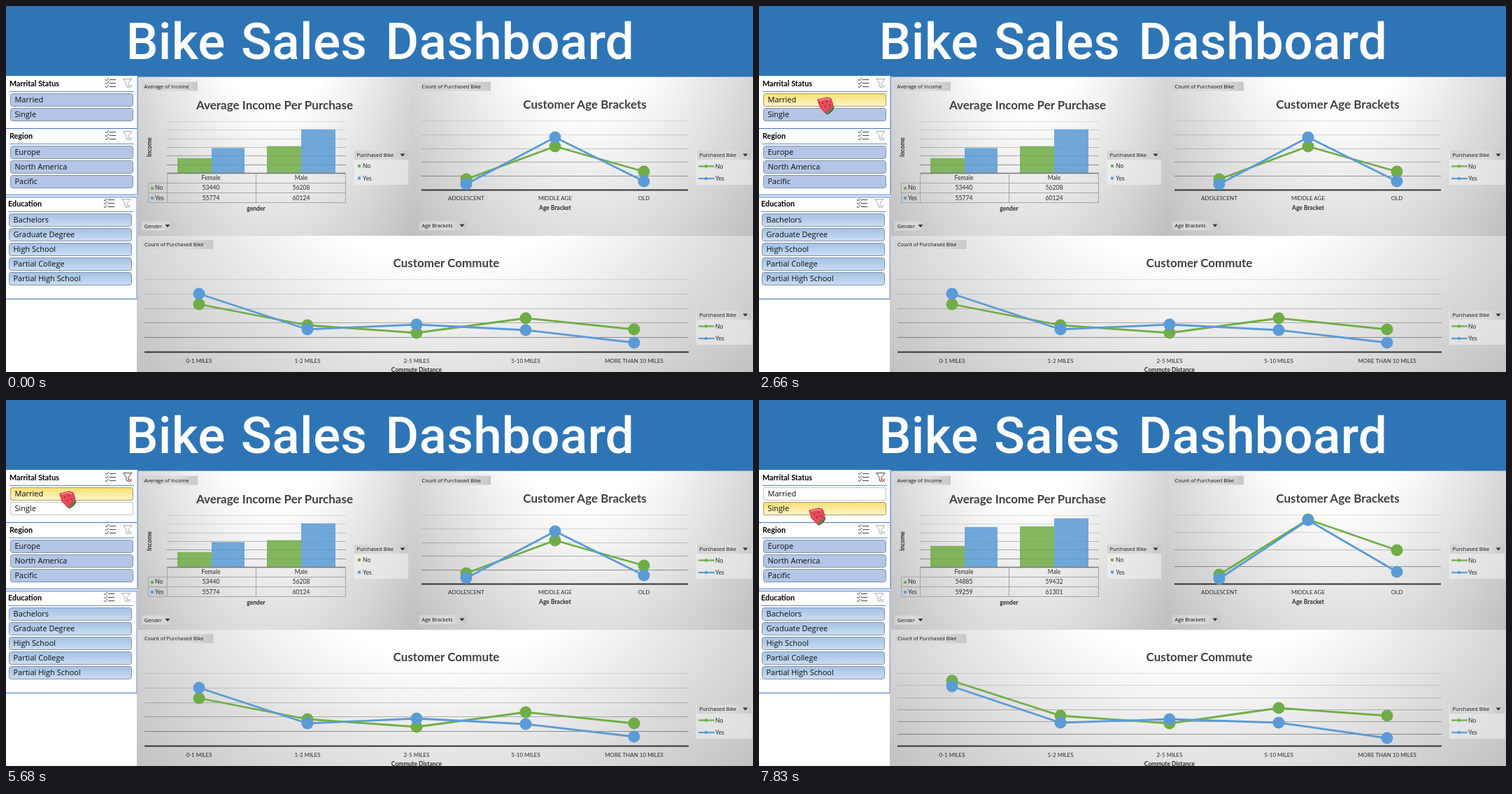
An HTML page for the animation above (8000 ms loop, 1068 by 524 pixels).

```html
<!DOCTYPE html>
<html lang="en">
<head>
<meta charset="utf-8">
<title>Bike Sales Dashboard</title>
<style>
  @property --p { syntax: "<number>"; inherits: true; initial-value: 0; }
  html, body { margin: 0; width: 100%; height: 100%; overflow: hidden; background: #fff; }
  #stage { position: relative; width: 1068px; height: 524px; overflow: hidden; }
  .chart { position: absolute; background: radial-gradient(70.7% 254.6% at 50% -80%, #fff 39%, #bfbfbf); }
  svg { position: absolute; inset: 0; display: block; animation: grow 8s infinite; }
  text { font-family: Lato, "Open Sans", sans-serif; fill: #2b2b2b; }
  .banner { font: 500 73px Roboto, sans-serif; fill: #fff; letter-spacing: .2px; }
  .title { font-size: 17px; font-weight: 700; fill: #404040; text-anchor: middle; }
  .name { font-size: 8.5px; font-weight: 700; text-anchor: middle; }
  .tick { font-size: 8px; text-anchor: middle; }
  .cell { font-size: 8.6px; text-anchor: middle; }
  .key { font-size: 8.6px; }
  .field { font: 7.4px "Open Sans", sans-serif; fill: #111; }
  .head { font-size: 10.8px; font-weight: 700; fill: #000; }
  .item { font: 11px "Open Sans", sans-serif; fill: #0c0c0c; }

  .step { opacity: 0; animation: 8s step-end infinite; }
  #MarriedHover { animation-name: married-hover; }
  #SingleHover { animation-name: single-hover; }
  #MarriedOff { animation-name: married-off; }
  #SingleOff, #filterOn { animation-name: single-off; }
  #cursor { animation: wander 8s ease-in-out infinite; }

  @keyframes grow {
    0%, 73.75% { --p: 0; animation-timing-function: ease-in-out; }
    83.4%, 100% { --p: 1; }
  }
  @keyframes married-hover {
    0% { opacity: 0 } 23.6% { opacity: 1 } 49.8% { opacity: 0 }
    60% { opacity: 1 } 85.2% { opacity: 0 } 100% { opacity: 0 }
  }
  @keyframes single-hover {
    0% { opacity: 0 } 49.8% { opacity: 1 } 60% { opacity: 0 }
    85.2% { opacity: 1 } 100% { opacity: 1 }
  }
  @keyframes married-off { 0% { opacity: 0 } 93.3% { opacity: 1 } 100% { opacity: 1 } }
  @keyframes single-off { 0% { opacity: 0 } 66.2% { opacity: 1 } 100% { opacity: 1 } }
  @keyframes wander {
    0%, 2.8% { transform: translate(994px, 526px); }
    12.7% { transform: translate(148px, 126px); }
    13.37% { transform: translate(137px, 121px); }
    18.1% { transform: translate(118px, 159px); }
    23.1% { transform: translate(110px, 134px); }
    29.5%, 48% { transform: translate(83px, 130px); }
    52.3%, 55.1% { transform: translate(78px, 161px); }
    65.1%, 83.9% { transform: translate(76px, 130px); }
    87.1%, 93.1% { transform: translate(71px, 148px); }
    95.7%, 100% { transform: translate(71px, 154px); }
  }
</style>
</head>
<body>
<div id="stage">
  <div class="chart" style="left:188px;top:102px;width:395px;height:227px"></div>
  <div class="chart" style="left:583px;top:102px;width:485px;height:227px"></div>
  <div class="chart" style="left:187px;top:329px;width:881px;height:214px"></div>
  <svg id="art" width="1068" height="524" viewBox="0 0 1068 524"></svg>
</div>
<script>
const GREEN = '#70ad47', BLUE = '#5b9bd5', EDGE = '#4472c4', RULE = '#a6a6a6';
const art = document.getElementById('art');

const text = (cls, x, y, s, more = '') => `<text class="${cls}" x="${x}" y="${y}" ${more}>${s}</text>`;
const rect = (x, y, w, h, fill, more = '') =>
  `<rect x="${x}" y="${y}" width="${w}" height="${h}" fill="${fill}" ${more}/>`;
const line = (x1, y1, x2, y2, color, w = 1) =>
  `<path d="M${x1} ${y1}L${x2} ${y2}" stroke="${color}" stroke-width="${w}" fill="none"/>`;

// Horizontal rules between top and base, darker towards the base
function grid(x1, x2, top, base, count) {
  let out = '';
  for (let i = 0; i < count; i++) {
    const y = Math.round(top + (base - top) * i / count) + .5;
    const shade = .1 + .28 * (i / (count - 1)) ** 1.5;
    out += line(x1, y, x2, y, `rgba(0,0,0,${shade.toFixed(2)})`);
  }
  return out;
}

function field(x, y, w, label, arrow) {
  let out = rect(x, y, w, 13, 'url(#fieldFill)') + text('field', x + 3.5, y + 9, label);
  if (arrow) out += `<path d="M${arrow - 3.5} ${y + 4.5}h7l-3.5 4z" fill="#3a2a2e"/>`;
  return out;
}

function slicer(x, y, label, items, fill) {
  let out = text('head', x - 1, y + 13.5, label) + line(x - 1, y + 21.5, x + 177, y + 21.5, '#5b86c8');
  out += `<g transform="translate(${x + 136} ${y})" stroke="#444" fill="none">
    <path d="M6 4.5h9M6 9.5h9M6 14.5h9"/><path d="M0 4l1.5 2L5 2M0 9l1.5 2L5 7M0 14l1.5 2L5 12"/></g>`;
  out += funnel(x + 161, y + 3, '#a8a8a8', '#b5b5b5');
  items.forEach((name, i) => {
    const by = y + 24.5 + i * 21;
    const box = (f, more) => rect(x + .5, by, 175, 18, f, `rx="3" stroke="#8491a8" ${more}`);
    out += box(fill, '');
    if (name === 'Married' || name === 'Single')
      out += box('#fff', `class="step" id="${name}Off" style="stroke:#c4c4c4"`) +
             box('url(#hoverFill)', `class="step" id="${name}Hover" style="stroke:#aa9a5c"`);
    out += text('item', x + 6.5, by + 12.5, name);
  });
  return out;
}

function funnel(x, y, color, cross) {
  return `<g transform="translate(${x} ${y})" fill="none"><path d="M.5 .5h12.5l-5 6v6.5l-3-2V6.5z" stroke="${color}"/>
    <path d="M9 9l4 4M13 9l-4 4" stroke="${cross}"/></g>`;
}

function lineLegend(y) {
  let out = rect(986.5, y, 80, 49, 'rgba(242,242,242,.55)') + field(988, y, 78, 'Purchased Bike', 1057);
  [['No', GREEN], ['Yes', BLUE]].forEach(([name, color], i) => {
    const ly = y + 22.5 + i * 17.5;
    out += line(990, ly, 1013, ly, color, 2.2) + `<circle cx="1001" cy="${ly}" r="2.2" fill="${color}"/>` +
           text('key', 1014, ly + 3, name);
  });
  return out;
}

const plots = [
  { id: 'age', xs: [658, 785, 912], series: [
    [[248, 201, 237], [250, 171, 215], GREEN],
    [[255, 188, 251], [256, 172, 246], BLUE]] },
  { id: 'commute', xs: [276, 431, 587, 743, 898], series: [
    [[427, 457, 468, 447, 463], [402, 452, 463, 441, 452], GREEN],
    [[412, 463, 456, 464, 482], [410, 462, 457, 462, 484], BLUE]] }
];
// x, width, first and last value, colour, label position
const bars = [
  [245, 49, 53440, 54885, GREEN, 293, 263], [294, 47, 55774, 59259, BLUE, 293, 278],
  [373, 49, 56208, 59432, GREEN, 422, 263], [422, 49, 60124, 61301, BLUE, 422, 278]
];

let html = `<defs>
  <linearGradient id="fieldFill"><stop stop-color="#d2d2d2"/><stop offset=".6" stop-color="#dcdcdc"/><stop offset="1" stop-color="#c8c8c8"/></linearGradient>
  <linearGradient id="hoverFill" x2="0" y2="1"><stop stop-color="#f7df70"/><stop offset="1" stop-color="#fff6cd"/></linearGradient>
  <linearGradient id="eduFill" x2="0" y2="1"><stop stop-color="#a3c1e4"/><stop offset="1" stop-color="#cbddf2"/></linearGradient>
</defs>`;

html += rect(0, 0, 1068, 101, '#2e75b6') + line(188, 101.5, 1068, 101.5, '#8fa9c6') +
  text('banner', 171.5, 76, 'Bike <tspan dx="4">Sales </tspan><tspan dx="8">Dashboard</tspan>');

// Slicer column
html += rect(0, 100, 188, 171, '#fff') + rect(0, 271, 187, 253, '#fff') +
  slicer(6, 101, 'Marrital Status', ['Married', 'Single'], '#b4c6e7') +
  slicer(6, 176, 'Region', ['Europe', 'North America', 'Pacific'], '#b4c6e7') +
  slicer(4, 273, 'Education', ['Bachelors', 'Graduate Degree', 'High School', 'Partial College', 'Partial High School'], 'url(#eduFill)') +
  `<g id="filterOn" class="step">${rect(166, 103, 16, 16, '#fff') + funnel(167, 104, '#444', '#d22')}</g>` +
  [175.5, 270.5, 273.5, 419.5].map(y => line(0, y, 187, y, EDGE)).join('') +
  line(188, 101, 188, 271, EDGE) + line(187, 273, 187, 420, '#6f8fc0');

// Average income
html += field(194, 108.5, 80, 'Average of Income') + text('title', 384, 147.5, 'Average Income Per Purchase') +
  grid(230, 486, 165, 239, 6) +
  bars.map((b, i) => rect(b[0], 0, b[1], 0, b[4], `id="bar${i}" fill-opacity=".86"`)).join('') +
  text('name', 0, 0, 'Income', 'transform="translate(208 202) rotate(-90)"') +
  line(230, 239.5, 486, 239.5, '#777', 1.5) +
  [253.5, 267.5, 281.5].map(y => line(203, y, 486, y, RULE)).join('') +
  line(203.5, 253, 203.5, 282, RULE) +
  [230.5, 357.5, 485.5].map(x => line(x, 239, x, 282, RULE)).join('') +
  text('cell', 293, 249, 'Female') + text('cell', 422, 249, 'Male') +
  bars.map((b, i) => text('cell', b[5], b[6], b[2], `id="val${i}"`)).join('') +
  rect(207, 259, 4, 4, GREEN) + text('key', 213, 263, 'No') +
  rect(207, 273, 4, 4, BLUE) + text('key', 213, 278, 'Yes') +
  text('name', 357.5, 293, 'gender') + field(194, 308.5, 46, 'Gender', 231) +
  rect(498, 207, 77, 49, 'rgba(242,242,242,.55)') + field(498, 207, 77, 'Purchased Bike', 567) +
  rect(503, 227, 4, 4, GREEN) + text('key', 510, 232, 'No') +
  rect(503, 244.5, 4, 4, BLUE) + text('key', 510, 250, 'Yes');

// Line charts
const marks = plot => plot.series.map((s, k) =>
  `<g fill="${s[2]}"><path id="${plot.id}${k}" fill="none" stroke="${s[2]}" stroke-width="2.8" stroke-linejoin="round"/>` +
  plot.xs.map((x, i) => `<circle id="${plot.id}${k}dot${i}" cx="${x}" r="8.5"/>`).join('') + '</g>').join('');
const ticks = (plot, y, names) => names.map((s, i) => text('tick', plot.xs[i], y, s)).join('');
const grids = (x1, x2, top, base, before, after) =>
  `<g class="before">${grid(x1, x2, top, base, before)}</g><g class="after">${grid(x1, x2, top, base, after)}</g>` +
  line(x1, base + .4, x2, base + .4, '#333', 2);

html += field(591, 108.5, 102, 'Count of Purchased Bike') + text('title', 827.5, 147, 'Customer Age Brackets') +
  grids(594, 975, 164, 263, 5, 4) + marks(plots[0]) +
  ticks(plots[0], 277.5, ['ADOLESCENT', 'MIDDLE AGE', 'OLD']) +
  text('name', 785, 292, 'Age Bracket') + field(591, 308, 68, 'Age Brackets', 652) + lineLegend(207);

html += field(194.5, 335, 102, 'Count of Purchased Bike') + text('title', 629.5, 374, 'Customer Commute') +
  grids(198, 976, 391, 495, 5, 6) + marks(plots[1]) +
  ticks(plots[1], 510.5, ['0-1 MILES', '1-2 MILES', '2-5 MILES', '5-10 MILES', 'MORE THAN 10 MILES']) +
  text('name', 587, 523.5, 'Commute Distance') + lineLegend(436);

// Watermelon pointer
html += `<g id="cursor">
  <path d="M21 12L24.5 14.5Q23 22 14 25.5L11.5 23Z" fill="#46502a"/>
  <path d="M22.5 14Q20 20.5 13.5 23.5" stroke="#6b9a48" stroke-width="2" fill="none"/>
  <path d="M.8 4L14 .8L20 2.5L23 11.5Q19 19 12 23.5L4 15Z" fill="#e64b5b" stroke="#c43a4b" stroke-linejoin="round"/>
  <path d="M3 5L13 2.500L18 4" stroke="#f59aa0" stroke-width="1.5" fill="none"/>
  <path d="M8 8v2M14 6v2M12 13v2M18 11v2" stroke="#7a1f30" stroke-width="1.3"/></g>`;
art.innerHTML = html;

const find = id => document.getElementById(id);
const mix = (a, b, p) => a + (b - a) * p;

function draw() {
  const p = parseFloat(getComputedStyle(art).getPropertyValue('--p')) || 0;
  bars.forEach((b, i) => {
    const h = (mix(b[2], b[3], p) - 50000) * 74 / 12000;
    find('bar' + i).setAttribute('y', 239 - h);
    find('bar' + i).setAttribute('height', h);
    find('val' + i).textContent = p > 0 ? b[3] : b[2];
  });
  plots.forEach(plot => plot.series.forEach(([from, to], k) => {
    const ys = from.map((y, i) => mix(y, to[i], p));
    find(plot.id + k).setAttribute('d', 'M' + ys.map((y, i) => plot.xs[i] + ' ' + y).join('L'));
    ys.forEach((y, i) => find(plot.id + k + 'dot' + i).setAttribute('cy', y));
  }));
  art.querySelectorAll('.before').forEach(g => g.style.opacity = 1 - p);
  art.querySelectorAll('.after').forEach(g => g.style.opacity = p);
  requestAnimationFrame(draw);
}
draw();
</script>
</body>
</html>
```
